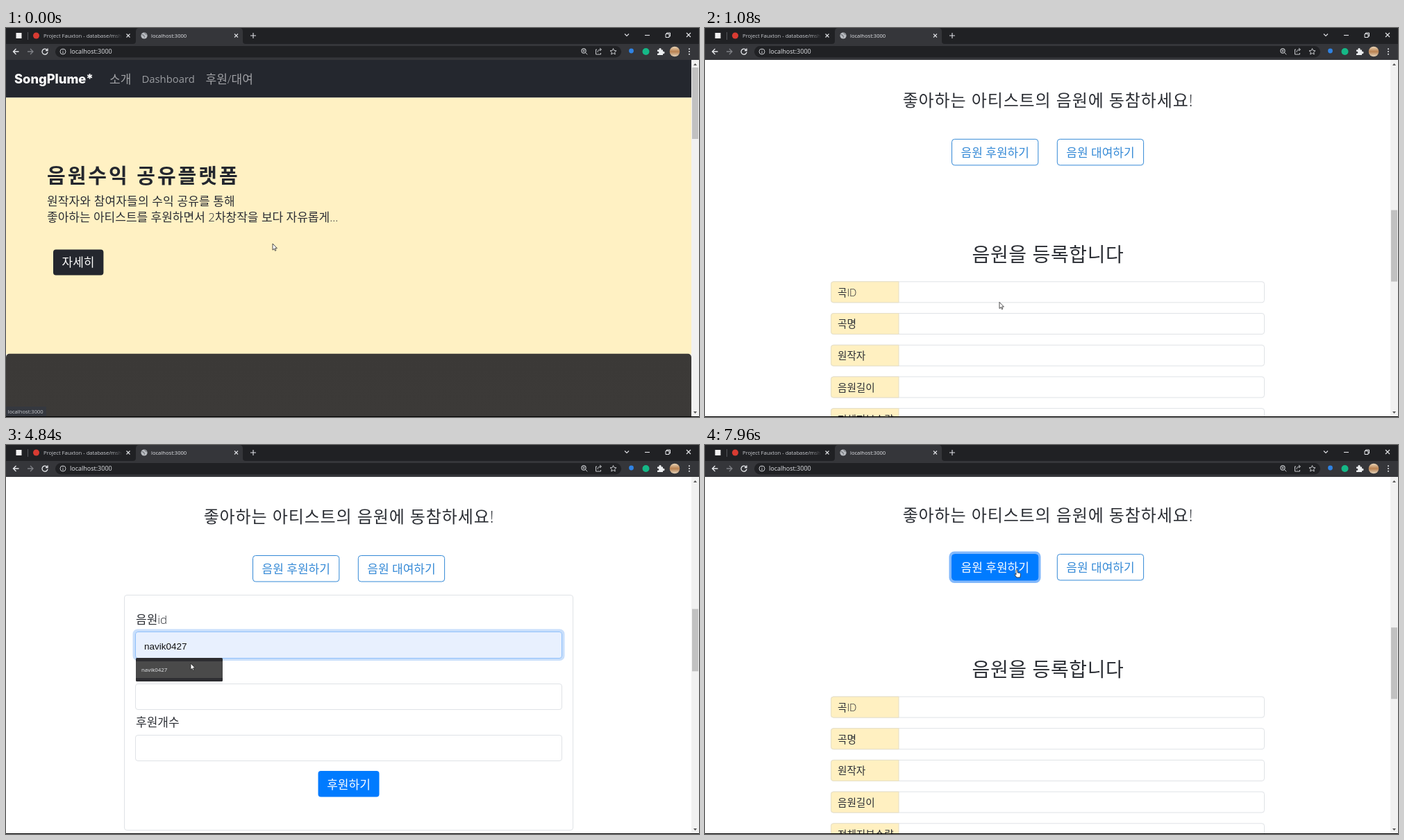
Animation, 998 px wide and 561 px high, one loop 8000 ms. Source, as an HTML page:

```html
<!DOCTYPE html>
<html lang="ko">
<head>
<meta charset="utf-8">
<title>SongPlume</title>
<style>
html, body { margin: 0; width: 100%; height: 100%; overflow: hidden; background: #fff; }
svg { display: block; width: 998px; height: 561px; }
text { font-family: "Open Sans", "Noto Sans CJK KR", "Noto Sans CJK", sans-serif; white-space: pre; }
#page text { font-weight: 300; }
#page .title { font-weight: 700; }
#page .latin { font-weight: 400; }
#page .brand { font-family: Inter, sans-serif; font-weight: 800; }
#page .field { font-family: "Liberation Sans", sans-serif; font-weight: 400; }
</style>
</head>
<body>
<svg id="stage" viewBox="0 0 998 561"></svg>
<script>
const LOOP = 8000, DARK = '#24272e', INK = '#2b2e34', BLUE = '#007bff', OUTLINE = [52, 137, 214];
const PANEL_TOP = 1243, PANEL_SPACE = 360;

const rect = (x, y, w, h, fill, extra = '') =>
  `<rect x="${x}" y="${y}" width="${w}" height="${h}" fill="${fill}" ${extra}/>`;
const disc = (x, y, r, fill, extra = '') =>
  `<circle cx="${x}" cy="${y}" r="${r}" fill="${fill}" ${extra}/>`;
const line = (d, stroke = '#dfe1e5', w = 1.1, extra = '') =>
  `<path d="${d}" fill="none" stroke="${stroke}" stroke-width="${w}" ${extra}/>`;
// y is the visual middle of the line of text
const text = (s, x, y, size, fill = INK, extra = '') =>
  `<text x="${x}" y="${y + size * .37}" font-size="${size}" fill="${fill}" ${extra}>${s}</text>`;
const mid = (s, x, y, size, fill = INK, extra = '') =>
  text(s, x, y, size, fill, `text-anchor="middle" ${extra}`);
const box = (x, y, w, h, extra = '') =>
  rect(x + .5, y + .5, w - 1, h - 1, '#fff', `rx="3.5" stroke="#dfe2e6" ${extra}`);

const hero = () =>
  rect(0, 46, 987, 54.5, DARK) +
  text('SongPlume*', 12, 73, 18.3, '#fff', 'class="brand"') +
  text('소개', 149, 74, 17, '#a2a3a7') +
  text('Dashboard', 195.5, 74, 14.8, '#9a9ca0', 'class="latin"') +
  text('후원/대여', 287.5, 74, 17, '#a2a3a7') +
  rect(0, 100.5, 987, 370, '#fff1c3') +
  text('음원수익 공유플랫폼', 59, 213, 29, DARK, 'class="title" letter-spacing="3"') +
  text('원작자와 참여자들의 수익 공유를 통해', 59, 250, 17, INK, 'letter-spacing=".15"') +
  text('좋아하는 아티스트를 후원하면서 2차창작을 보다 자유롭게...', 59, 273, 17) +
  rect(68, 319.5, 72.4, 37, DARK, 'rx="4"') + mid('자세히', 104, 338, 17, '#fff');

const card = i => {
  const x = 281 + i * 144.4, cx = x + 68.2;
  return rect(x, 865, 136.5, 158, '#fff', 'rx="4"') +
    rect(x, 865, 136.5, 40, '#f7f7f9', 'rx="4"') +
    rect(x, 904.5, 136.5, 1, '#dfdfdf') +
    text('#000' + (i + 1), x + 16.5, 885.5, 14.7, INK, 'class="latin"') +
    disc(cx, 944, 23, DARK) + disc(cx, 944, 9, '#fff') + disc(cx, 944, 2.8, DARK) +
    line(`M${cx - 16} 944a16 16 0 0 1 16 -16`, '#fff', 3.2) +
    mid('song' + (i + 1), cx, 985, 25, INK, 'class="latin"');
};

const songs = () =>
  rect(0, 469.7, 987, 600.3, 'url(#shade)', 'rx="5"') + [0, 1, 2].map(card).join('');

const join = () =>
  mid('좋아하는 아티스트의 음원에 동참하세요!', 494, 1130.5, 24, INK, 'letter-spacing=".9"') +
  rect(353.5, 1184.5, 128, 41.5, 'none', 'id="ring" rx="5.5" stroke="#82b8fb" stroke-width="4"') +
  rect(355.5, 1186.5, 124.3, 37.5, '#fff', 'id="donate" rx="4"') +
  mid('음원 후원하기', 417.7, 1206, 17, INK, 'id="donateText"') +
  rect(507.3, 1186.5, 124.3, 37.5, '#fff', `rx="4" stroke="rgb(${OUTLINE})"`) +
  mid('음원 대여하기', 569.5, 1206, 17, `rgb(${OUTLINE})`);

const panel = () =>
  `<g clip-path="url(#fold)">` + box(170, PANEL_TOP, 647, 340) +
  text('음원id', 187, 1279, 17) +
  rect(184.5, 1294.5, 618, 41.5, 'none', 'id="glow" rx="5" stroke="#c9dffb" stroke-width="4"') +
  box(186, 1296, 615, 39, 'id="songId"') +
  text('navik0427', 199, 1317, 13.5, '#111', 'id="value" class="field"') +
  text('후원자이름', 187, 1353, 17) + box(186, 1371, 615, 38) +
  text('후원개수', 187, 1427, 17) + box(186, 1445, 615, 38) +
  rect(449.5, 1497, 88, 37.5, BLUE, 'rx="4"') + mid('후원하기', 493.5, 1516.5, 17, '#fff') +
  `<g id="menu">` + rect(187, 1334, 125, 34, '#2d2d31', 'rx="1.5"') +
  rect(187, 1339, 125, 24, '#4a4a4a', 'id="option"') +
  text('navik0427', 195, 1351, 7.9, '#e8eaed', 'class="latin"') + `</g></g>`;

const register = () => `<g id="register">` +
  mid('음원을 등록합니다', 494, 1352.5, 28, INK, 'letter-spacing=".6"') +
  ['곡ID', '곡명', '원작자', '음원길이', '전체지분수량'].map((label, i) => {
    const y = 1391.5 + i * 45.7;
    return box(181, y, 625, 31) +
      `<path d="M279 ${y + .5}h-94a3.5 3.5 0 0 0 -3.5 3.5v23a3.5 3.5 0 0 0 3.5 3.5h94z" fill="#fff0c1" stroke="#e6dfc6"/>` +
      text(label, 191, y + 16, 14.6);
  }).join('') + `</g>`;

const cross = x => line(`M${x - 2.5} 8.5l5 5m0 -5l-5 5`);

const browser = () =>
  rect(0, 0, 998, 46, '#202124') +
  `<path d="M183 23q4 0 4 -4V5q0 -5 5 -5H336q5 0 5 5V19q0 4 4 4z" fill="#35363a"/>` +
  rect(0, 23, 998, 23, '#35363a') +
  rect(71, 26, 815, 16.5, '#202124', 'rx="8.2"') +
  rect(14.5, 7, 8, 8, '#f1f1f1') + rect(31, 6, 1, 11, '#55575b') +
  disc(43.5, 11, 4.5, '#d83b32') +
  text('Project Fauxton - database/msh', 54, 11, 7.6, 'url(#fade)') + cross(176) +
  disc(199, 11, 4.6, '#b8bbc0') + line('M195.5 9.5l3 1l1 3m0 -6l3 2', '#5c5f64', 1) +
  text('localhost:3000', 209, 11, 7.6, '#e4e6ea') + cross(331.5) +
  line('M352 11h8m-4 -4v8') +
  line('M891 8.5l3 3l3 -3') + line('M920 10.5h7') +
  line('M950 8.5h5v5h-5zM951.5 8.5v-1.5h5v5h-1.5', '#e8eaed', 1) +
  line('M980 7l6 6m0 -6l-6 6', '#e8eaed') +
  line('M18.5 34h-8m4 -4l-4 4l4 4', '#e8eaed', 1.3) +
  line('M31 34h8m-4 -4l4 4l-4 4', '#7f8186', 1.3) +
  line('M59 31.5a4 4 0 1 0 1 3.2M60 29.5v3h-3', '#e8eaed', 1.3) +
  disc(82, 34, 4, 'none', 'stroke="#c5c7cb"') + line('M82 33.5v3m0 -5.2v1', '#c5c7cb') +
  text('localhost:3000', 92, 34, 9, '#e4e6ea') +
  disc(832, 33, 3.1, 'none', 'stroke="#c5c7cb" stroke-width="1.1"') +
  line('M834.3 35.3l3 3M830.5 33h3m-1.5 -1.5v3', '#c5c7cb', 1) +
  line('M851 31h-1.5v7h7v-2M852 35q0 -4 5 -4m-2 -2l2.5 2l-2.5 2', '#c5c7cb', 1) +
  line('M874.5 29.5l1.3 3l3.2 .3l-2.4 2.1l.7 3.1l-2.8 -1.6l-2.8 1.6l.7 -3.1l-2.4 -2.1l3.2 -.3z', '#c5c7cb', 1) +
  disc(900.5, 33, 3.4, '#2f83e4') + disc(921.5, 34, 5, '#15b887') +
  `<path d="M938 31.5h2.5a1.7 1.7 0 1 1 3 0h2.5v2.5a1.7 1.7 0 1 1 0 3v2h-8v-2.5a1.5 1.5 0 1 0 0 -2.5z" fill="#eceef0"/>` +
  disc(963, 34, 7.3, 'url(#avatar)') +
  [30.2, 34, 37.8].map(y => disc(984, y, 1, '#e8eaed')).join('');

const scrollbar = () =>
  rect(987, 46, 11, 514, '#f1f1f1') +
  `<path d="M990 54l2.5 -3l2.5 3zM990 553l2.5 3l2.5 -3z" fill="#555"/>` +
  rect(988, 57, 9, 103, '#c1c1c1', 'id="thumb"');

const defs = `<defs>
  <linearGradient id="shade" x2="0" y2="1"><stop stop-color="#3b3937"/><stop offset=".15" stop-color="#3c3a38"/>
    <stop offset=".6" stop-color="#4b4b4d"/></linearGradient>
  <linearGradient id="fade" gradientUnits="userSpaceOnUse" x1="152" x2="168"><stop stop-color="#c9cbd0"/>
    <stop offset="1" stop-color="#c9cbd0" stop-opacity="0"/></linearGradient>
  <linearGradient id="avatar" x2="0" y2="1"><stop stop-color="#e9d5b8"/><stop offset=".5" stop-color="#b98150"/>
    <stop offset="1" stop-color="#e2d2ba"/></linearGradient>
  <clipPath id="fold"><rect id="foldBox" x="150" y="${PANEL_TOP}" width="690" height="0"/></clipPath></defs>`;

const stage = document.getElementById('stage');
stage.innerHTML = defs + rect(0, 0, 998, 561, '#fff') +
  `<g id="page">${hero()}${songs()}${join()}${panel()}${register()}</g>` +
  browser() + scrollbar() +
  `<g id="status">${rect(0, 546, 58, 14, '#35383f', 'rx="1"')}${text('localhost:3000', 2.5, 553, 7.6, '#c9cbd0')}</g>` +
  rect(0, 560, 998, 1, '#000') +
  `<path id="arrow" d="M0 0v9.2l2.1 -1.9l1.4 3l1.4 -.6l-1.4 -3h2.9z" fill="#fff" stroke="#222" stroke-width=".8"/>
  <path id="hand" d="M-1 1q0 -1.2 1 -1.2t1 1.2v3l3.5 .8q1.3 .4 1 2l-.7 4.2h-5l-3 -4.2q.3 -1.4 2.2 .2z" fill="#fff" stroke="#222" stroke-width=".8"/>`;

const el = Object.fromEntries([...stage.querySelectorAll('[id]')].map(e => [e.id, e]));

// [time, value...] rows
const scrollSteps = [[40, 0], [160, 130], [440, 790], [560, 960], [660, 1018], [900, 1018], [1100, 1027],
  [5480, 1027], [5620, 905], [5840, 822], [6760, 822], [6920, 944], [7400, 1029]];
const pointerSteps = [[40, 384, 311], [640, 424, 397], [1060, 424, 397], [1480, 425, 173], [3400, 425, 173],
  [3640, 330, 292], [4000, 330, 292], [4640, 266, 315], [5120, 266, 315], [5440, 480, 345], [5900, 440, 470],
  [6200, 436, 425], [6360, 435, 391], [6600, 435, 391], [6920, 601, 243], [7200, 590, 205], [7760, 449, 180]];
const foldSteps = [[2100, 0], [2450, PANEL_SPACE], [6500, PANEL_SPACE], [6820, 0]];
const hovers = [[1420, 3440], [6280, 6660], [7640, LOOP]];

const clamp = v => Math.max(0, Math.min(1, v));
const smooth = p => p * p * (3 - 2 * p);
const linear = p => p;
const within = (t, a, b) => t >= a && t < b;
const show = (e, on) => e.setAttribute('visibility', on ? 'visible' : 'hidden');

function sample(steps, t, ease) {
  const i = steps.findIndex(s => s[0] > t);
  if (i === 0) return steps[0].slice(1);
  if (i < 0) return steps[steps.length - 1].slice(1);
  const a = steps[i - 1], b = steps[i], p = ease((t - a[0]) / (b[0] - a[0]));
  return a.slice(1).map((v, k) => v + (b[k + 1] - v) * p);
}

const mix = (a, b, p) => `rgb(${a.map((v, i) => Math.round(v + (b[i] - v) * p))})`;

function draw(t) {
  const [scroll] = sample(scrollSteps, t, linear);
  const [fold] = sample(foldSteps, t, smooth);
  const [x, y] = sample(pointerSteps, t, smooth);
  el.page.setAttribute('transform', `translate(0 ${-scroll})`);
  el.register.setAttribute('transform', `translate(0 ${fold})`);
  el.foldBox.setAttribute('height', fold);

  const ratio = 492 / (2455 + fold);
  el.thumb.setAttribute('y', 57 + scroll * ratio);
  el.thumb.setAttribute('height', 514 * ratio);

  const hover = Math.max(...hovers.map(([a, b]) => clamp((t - a) / 150) * (1 - clamp((t - b) / 150))));
  el.donate.setAttribute('fill', mix([255, 255, 255], [0, 123, 255], hover));
  el.donate.setAttribute('stroke', mix(OUTLINE, [0, 123, 255], hover));
  el.donateText.setAttribute('fill', mix(OUTLINE, [255, 255, 255], hover));
  show(el.ring, within(t, 2000, 3840) || t >= 6460);

  const focused = within(t, 3840, 5440), preview = within(t, 4440, 5200);
  show(el.glow, focused);
  el.songId.setAttribute('stroke', focused ? '#8fc0fb' : '#dfe2e6');
  el.songId.setAttribute('fill', preview ? '#e8f0fe' : '#fff');
  show(el.value, preview);
  show(el.menu, within(t, 3920, 5280));
  el.option.setAttribute('fill', preview ? '#4a4a4a' : '#2d2d31');

  show(el.status, t < 240);
  const pointing = hovers.some(([a, b]) => within(t, a, b));
  show(el.hand, pointing);
  show(el.arrow, !pointing);
  (pointing ? el.hand : el.arrow).setAttribute('transform', `translate(${x} ${y})`);
}

const start = performance.now();
function tick() {
  draw((performance.now() - start) % LOOP);
  requestAnimationFrame(tick);
}
tick();
</script>
</body>
</html>
```
